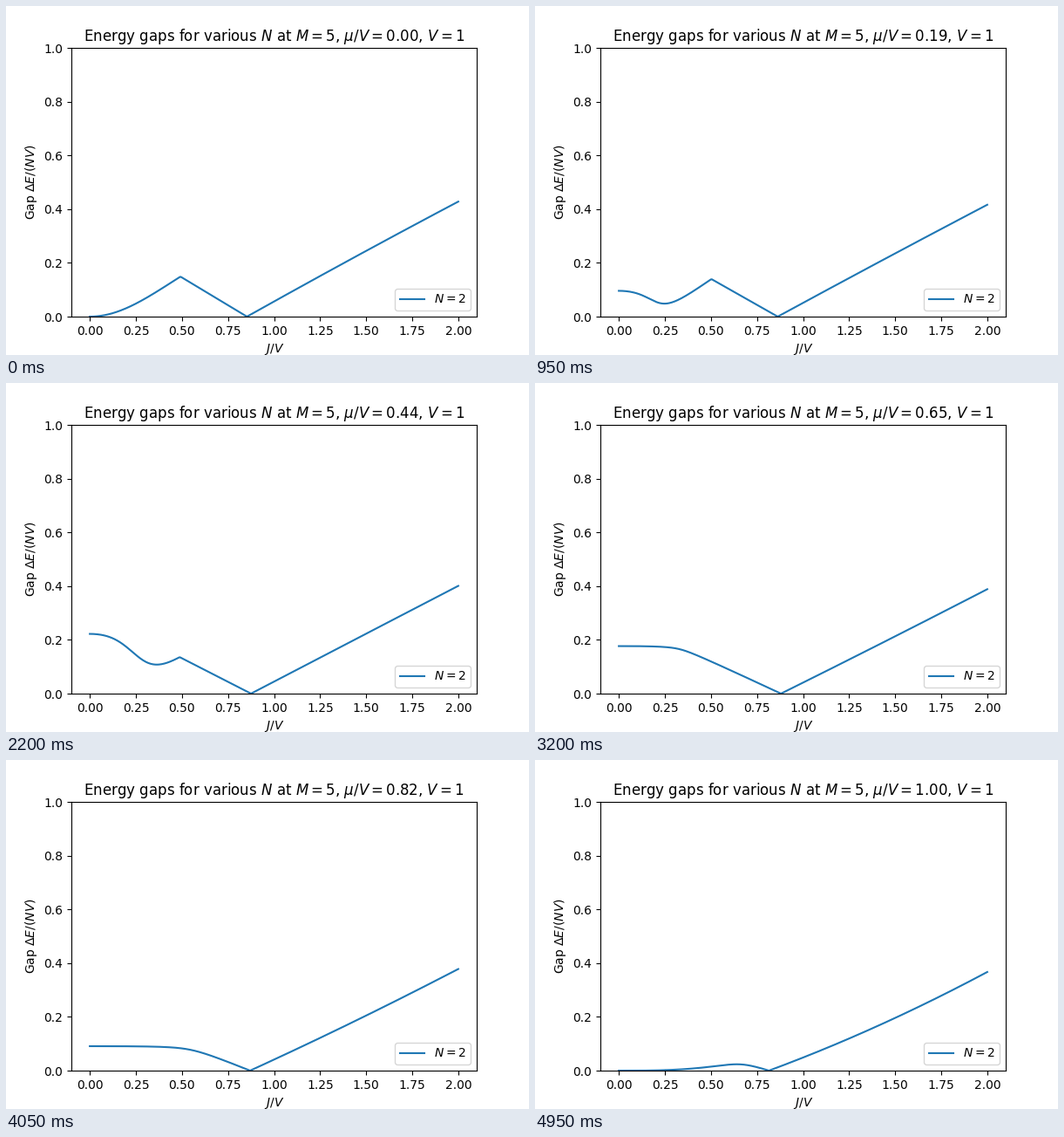
Write a matplotlib script that moves like this. It is 600 px wide and 400 px high and loops after 5 s.

```python
import numpy as np
import matplotlib.pyplot as plt
from matplotlib.animation import FuncAnimation

FRAMES = 100
J = np.linspace(0, 2, 401)


def hole_branch(j, mu):
    """Gap to the state with one boson fewer: flat, then a smooth dip."""
    m, u = mu / 2, j**2
    base = 0.85 * u / (1 + 1.58 * u)
    a = 0.85 * u / (1 + 1.7 * u)
    b = 5.5 * j**3
    return base + np.hypot(m - a, b) - np.hypot(a, b)


def mixed_branch(j, mu, zero):
    """Lower of two coupled levels, one flat and one falling to zero."""
    def flat(x):
        return (1 - mu) / 2 + x**3 * max(-0.1, 0.8 * (mu - 0.82))

    def mix(x):
        return 0.03 * x

    slope = 0.41 - 0.12 * mu - 0.05 * mu**2
    falling = slope * (zero - j) + mix(zero)**2 / flat(zero)
    level = flat(j)
    return (level + falling) / 2 - np.hypot((level - falling) / 2, mix(j))


def rising_branch(j, mu, zero):
    """Nearly straight growth after the ground state has switched."""
    end = 0.428 - 0.061 * mu
    bend = -0.03 + 0.06 * mu + 0.15 * mu**6
    t = (j - zero) / (2 - zero)
    return end * t * (1 - bend * (1 - t))


def gap(mu):
    zero = 0.853 + 0.05 * mu - 0.088 * mu**6.5
    left = np.minimum(hole_branch(J, mu), mixed_branch(J, mu, zero))
    right = rising_branch(J, mu, zero)
    return np.maximum(np.where(J < zero, left, right), 0)


fig, ax = plt.subplots(figsize=(6, 4), dpi=100)
line, = ax.plot(J, gap(0), label="$N=2$")
ax.set_ylim(0, 1)
ax.set_xlabel("$J/V$")
ax.set_ylabel(r"Gap $\Delta E/(NV)$")
ax.legend(loc="lower right")
title = ax.set_title("")


def draw(i):
    mu = i / (FRAMES - 1)
    line.set_ydata(gap(mu))
    title.set_text(
        rf"Energy gaps for various $N$ at $M=5$, $\mu/V={mu:.2f}$, $V=1$")
    return line, title


anim = FuncAnimation(fig, draw, frames=FRAMES, interval=50,
                     repeat=True, repeat_delay=0)
plt.show()
```
